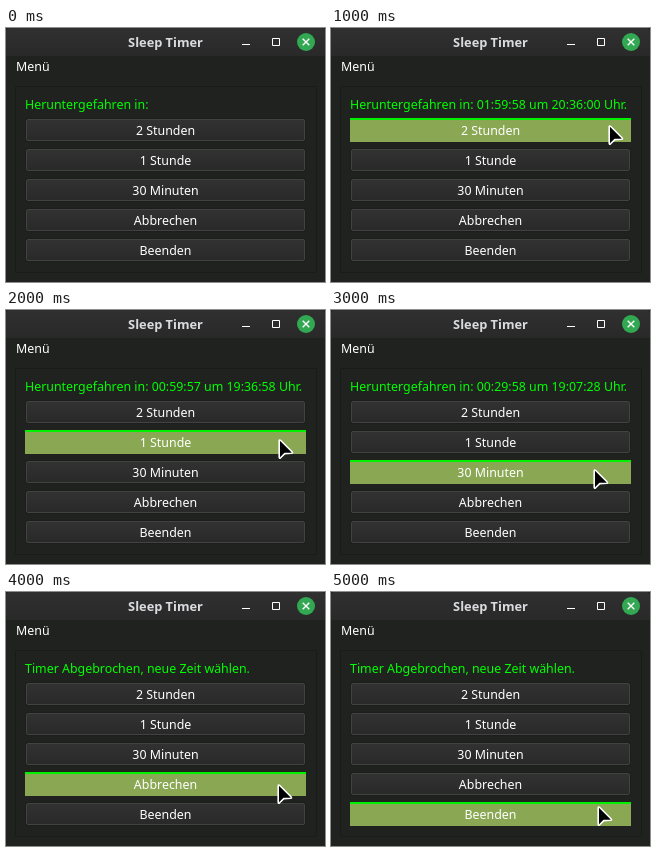
Animation, 319 px wide and 254 px high, one loop 6000 ms. Source, as an HTML page:

```html
<!DOCTYPE html>
<html lang="de">
<head>
<meta charset="utf-8">
<title>Sleep Timer</title>
<style>
  html, body { margin: 0; width: 100%; height: 100%; overflow: hidden; background: #202220; }
  svg { display: block; width: 319px; height: 254px; }
  text { font: 12.4px "Noto Sans", "Open Sans", sans-serif; fill: #fff; }
  .middle { text-anchor: middle; }
  .title { font-size: 12.8px; font-weight: 600; fill: #dadbde; }
  #status { fill: #00ff00; }
  .control { fill: none; stroke: #fff; }
</style>
</head>
<body>
<svg id="stage" viewBox="0 0 319 254">
  <defs>
    <linearGradient id="bar" x2="0" y2="1">
      <stop stop-color="#303030"/><stop offset="1" stop-color="#292929"/>
    </linearGradient>
    <linearGradient id="face" x2="0" y2="1">
      <stop stop-color="#313231"/><stop offset="1" stop-color="#282928"/>
    </linearGradient>
  </defs>
  <rect width="319" height="254" fill="#202220"/>
  <path d="M0 28V4Q0 0 4 0H315Q319 0 319 4V28Z" fill="url(#bar)"/>
  <text class="title middle" x="159.5" y="19">Sleep Timer</text>
  <path class="control" d="M236 16.5H244M266.5 10.5H273.5V17.5H266.5Z"/>
  <circle cx="300" cy="14" r="9" fill="#32a852"/>
  <path class="control" stroke-width="1.4" d="M296.7 10.7L303.3 17.3M303.3 10.7L296.7 17.3"/>
  <text x="10" y="43">Menü</text>
  <rect x="9.5" y="58.5" width="301" height="186" rx="1" fill="none" stroke="#191b19"/>
  <text id="status" x="19" y="81"></text>
  <g id="buttons"></g>
  <g id="hover">
    <rect x="19" y="90" width="281" height="24" fill="#8aa854"/>
    <rect x="19" y="90" width="281" height="2" fill="#00f000"/>
  </g>
  <g id="labels"></g>
  <path id="cursor" d="M1.2 1.8V18.2Q1.3 19.8 2.6 18.8L6.8 14.6L13.6 14.3Q15.2 14 14 12.8L2.5 1.3Q1.3 .5 1.2 1.8Z"
        fill="#000" stroke="#fff" stroke-width="1.6" stroke-linejoin="round"/>
</svg>
<script>
  const STEP = 1000, ROW = 30;
  const labels = ["2 Stunden", "1 Stunde", "30 Minuten", "Abbrechen", "Beenden"];
  const prefix = "Heruntergefahren in:";
  const cancelled = "Timer Abgebrochen, neue Zeit wählen.";

  // Each step: status text, cursor x, cursor y; the hovered row follows the step.
  const steps = [
    [prefix],
    [prefix + " 01:59:58 um 20:36:00 Uhr.", 277, 97],
    [prefix + " 00:59:57 um 19:36:58 Uhr.", 272, 129],
    [prefix + " 00:29:58 um 19:07:28 Uhr.", 262, 159],
    [cancelled, 271, 192],
    [cancelled, 266, 214]
  ];

  const byId = id => document.getElementById(id);
  const status = byId("status"), hover = byId("hover"), cursor = byId("cursor");

  function add(parent, tag, attrs, text = "") {
    const node = document.createElementNS(parent.namespaceURI, tag);
    for (const [name, value] of Object.entries(attrs)) node.setAttribute(name, value);
    node.textContent = text;
    parent.append(node);
  }

  labels.forEach((label, i) => {
    const y = i * ROW;
    add(byId("buttons"), "rect", {
      x: 19.5, y: 90.5 + y, width: 280, height: 23, rx: 2, fill: "#181a18"
    });
    add(byId("buttons"), "rect", {
      x: 20.5, y: 91.5 + y, width: 278, height: 21, rx: 1.5,
      fill: "url(#face)", stroke: "#414341"
    });
    add(byId("labels"), "text", { class: "middle", x: 159.5, y: 107 + y }, label);
  });

  let shown = -1;
  const start = performance.now();

  function show(index) {
    const [message, x = 0, y = 0] = steps[index];
    const visibility = index ? "visible" : "hidden";
    status.textContent = message;
    hover.setAttribute("visibility", visibility);
    hover.setAttribute("transform", `translate(0 ${(index - 1) * ROW})`);
    cursor.setAttribute("visibility", visibility);
    cursor.setAttribute("transform", `translate(${x} ${y})`);
  }

  function tick(now) {
    const index = Math.floor(Math.max(0, now - start) / STEP) % steps.length;
    if (index !== shown) show(shown = index);
    requestAnimationFrame(tick);
  }

  tick(start);
</script>
</body>
</html>
```
